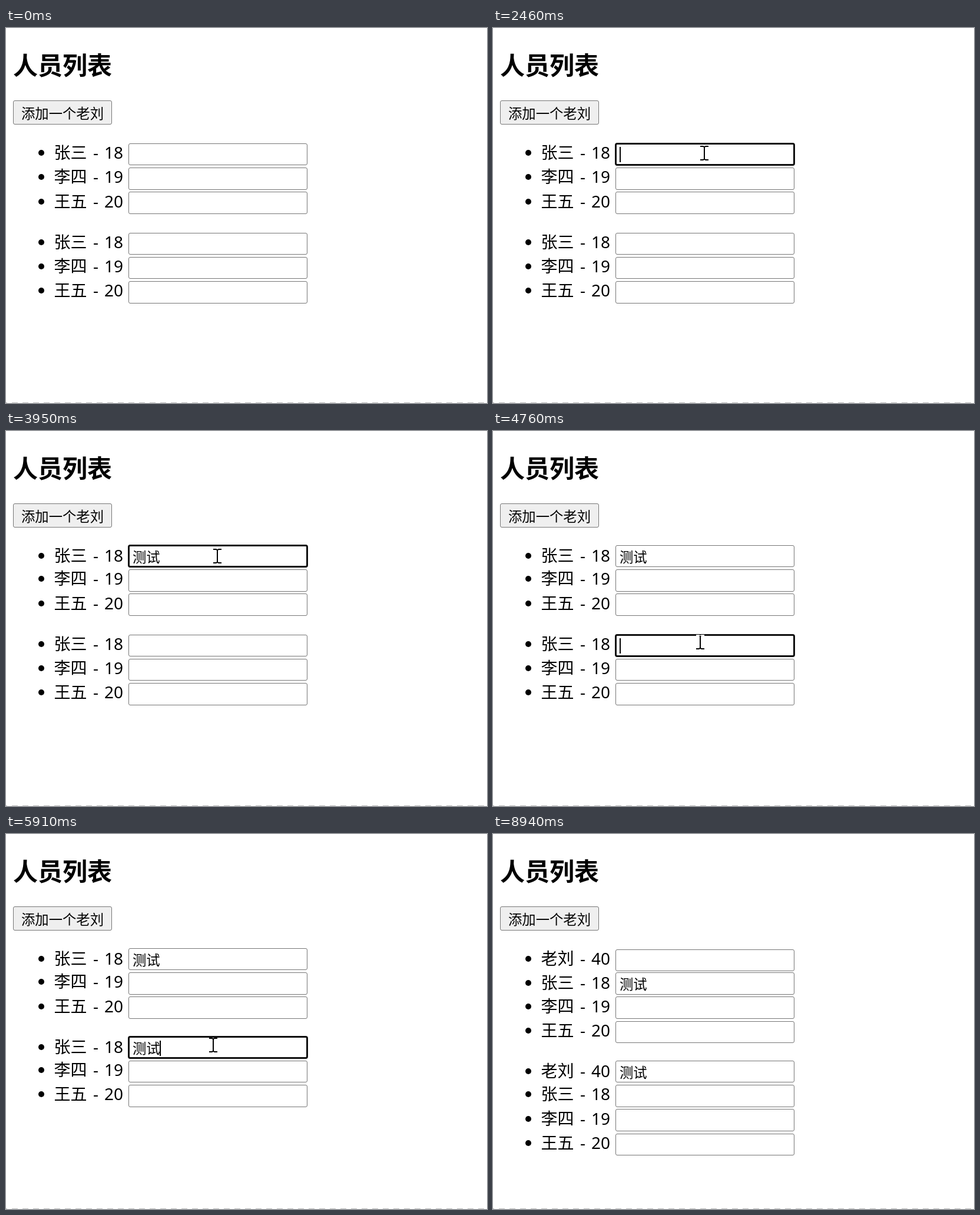
An HTML page that plays this animation: 817x637 px, repeating every 9870 ms.

```html
<!DOCTYPE html>
<html lang="zh-CN">
<head>
<meta charset="utf-8">
<title>人员列表</title>
<style>
  html, body { margin: 0; width: 100%; height: 100%; overflow: hidden; background: #fff; }
  svg { display: block; }
  text { font-family: "Noto Sans CJK SC", "Noto Sans CJK", sans-serif; white-space: pre; }
  .title { font-size: 42px; font-weight: bold; }
  .item { font-size: 28px; }
  .num { font-family: "Noto Sans", "Open Sans", sans-serif; }
  .field { font-size: 23.33px; }
  .latin { font-family: "Liberation Sans", Arial, sans-serif; }
  .spell { font-size: 28px; fill: #eee; }
  .word { font-size: 29.17px; fill: #eee; }
  .index { font-size: 23px; fill: #a5a5a5; }
  .word.first { fill: #f5823c; }
  .index.first { fill: #b5663a; }
  .panel { fill: #212121; filter: drop-shadow(0 0 2px rgba(0, 0, 0, .6)); }
  .chevron { fill: none; stroke-width: 2.4; }
  .beam { mix-blend-mode: difference; fill: #fff; }
</style>
</head>
<body>
<svg id="stage" width="817" height="637" viewBox="0 0 817 637">
  <defs>
    <radialGradient id="blue"><stop stop-color="#2f2c48" stop-opacity=".8"/><stop offset="1" stop-color="#2f2c48" stop-opacity="0"/></radialGradient>
    <radialGradient id="red"><stop stop-color="#52302c" stop-opacity=".8"/><stop offset="1" stop-color="#52302c" stop-opacity="0"/></radialGradient>
  </defs>
  <rect width="817" height="637" fill="#fff"/>
  <text class="title" x="12" y="79">人员列表</text>
  <path d="M0 636.5H817" stroke="#bdbdbd" stroke-dasharray="10 8" stroke-dashoffset="8"/>
  <g id="scene"></g>
  <g id="pointer"></g>
</svg>
<script>
const LOOP = 9870, TICK = 68, BLINK = 530, ROW = 41.2;
const scene = document.getElementById('scene');
const pointer = document.getElementById('pointer');

// time, focused list (-1 for none), spelling being typed, number of filled lists
const steps = [
  [0, -1, '', 0], [1400, 0, '', 0],
  [2810, 0, 'ce', 0], [3010, 0, 'ces', 0], [3150, 0, 'cesh', 0], [3220, 0, 'ceshi', 0],
  [3420, 0, '', 1], [4690, 1, '', 1],
  [4960, 1, 'c', 1], [5030, 1, 'ce', 1], [5430, 1, 'ces', 1], [5570, 1, 'cesh', 1], [5640, 1, 'ceshi', 1],
  [5910, 1, '', 2], [7540, -1, '', 2],
];
const PRESS = 7540, ADDED = 7670;

const moves = [
  { start: 720, count: 10, from: [562, 588], to: [359, 213] },
  { start: 4150, count: 9, from: [359, 213], to: [352, 359] },
  { start: 6440, count: 8, from: [352, 359], to: [121, 132] },
  { start: 8660, count: 4, from: [121, 132], to: [716, 288], leave: true },
];

const people = [['张三', 18], ['李四', 19], ['王五', 20]];
const candidates = {
  c: ['从', '才', '出', '成', '吃'],
  ce: ['测', '册', '侧', '策', '厕'],
  ces: ['测试', '厕所', '测速', '册数', ''],
  cesh: ['测试', '侧视', '策士', '侧室', '册'],
};
candidates.ceshi = candidates.cesh;

const advance = { c: .5, e: .556, s: .5, h: .556, i: .222, "'": .191 };
const measure = (s, size) => [...s].reduce((w, ch) => w + advance[ch] * size, 0);
const text = (cls, x, y, s) => `<text class="${cls}" x="${x}" y="${y}">${s}</text>`;
const box = (x, y, w, h, fill, extra = '') =>
  `<rect x="${x}" y="${y}" width="${w}" height="${h}" fill="${fill}" ${extra}/>`;

function layout(filled, added) {
  const names = added ? [['老刘', 40], ...people] : people;
  // The keyed list keeps its value with the person, the other with the position.
  const filledRow = [filled > 0 ? +added : -1, filled > 1 ? 0 : -1];
  const rows = [];
  let y = 196.05;
  for (let list = 0; list < 2; list++) {
    names.forEach(([name, age], i) => {
      const full = i === filledRow[list];
      if (full) y -= 2;
      const top = Math.round(y);
      rows.push({
        list, name, age, full, top, first: i === 0,
        height: Math.round(y + 37.4) - top,
        mid: Math.round(y + (full ? 18.2 : 16.2)),
      });
      y += ROW;
    });
    y += 28.1;
  }
  return rows;
}

function drawRow(r, focus, typed, caret) {
  const on = r.first && r.list === focus;
  const base = r.mid + 10;
  let out = `<circle cx="60" cy="${r.mid}" r="5"/>`
    + text('item', 81.5, base, r.name)
    + text('item num', 148, base, '-')
    + text('item num', 167, base, r.age)
    + box(208.5, r.top + .5, 303, r.height - 1, '#fff', 'rx="2.5" stroke="#767676"');
  if (on) {
    out += box(208.5, r.top + .5, 303, r.height - 1, '#fff',
      'rx="2.5" stroke="#101010" stroke-width="3"');
  }
  if (r.full) out += text('field', 215, r.mid + 11, '测试');
  if (on && typed) out += text('field latin', 215, base, typed);
  if (on && caret) {
    const x = 215 + (r.full ? 46.5 : measure(typed, 23.33));
    out += box(Math.floor(x), r.mid - (r.full ? 11 : 10), 2, 26, '#000');
  }
  return out;
}

function drawPanel(typed, y) {
  const spell = typed.length > 2 ? `ce'${typed.slice(2)}` : typed;
  let x = 244.5, words = '';
  candidates[typed].forEach((word, i) => {
    const cls = i ? '' : ' first';
    words += text('index num' + cls, x, y + 81, i + 1);
    if (word) {
      words += text('word' + cls, x + 19.5, y + 83, word);
      x += 46.6 + 29.17 * word.length;
    } else {
      words += box(684, y + 52, 38, 38, '#3f4241')
        + `<ellipse cx="703" cy="${y + 71}" rx="10" ry="9" fill="#2e2828"/>`
        + `<path d="M723 ${y + 86}h8l-4 4z" fill="#aaa"/>`;
      x += 94;
    }
  });
  const next = x + 38.5, right = next + 51, cy = y + 75, width = right - 217;
  const glow = (cx, cy, rx, ry, id) =>
    `<ellipse cx="${cx}" cy="${cy}" rx="${rx}" ry="${ry}" fill="url(#${id})"/>`;
  return `<rect class="panel" x="217" y="${y}" width="${width}" height="106" rx="4"/>`
    + `<svg x="217" y="${y}" width="${width}" height="106">`
    + glow(width - 80, 16, 60, 40, 'blue') + glow(width - 12, 8, 60, 56, 'red') + '</svg>'
    + `<circle cx="${next + 11}" cy="${y + 27}" r="17" fill="#f07a2a"/>`
    + text('spell latin', 244, y + 37, spell)
    + box(Math.floor(244 + measure(spell, 28)), y + 11, 1.5, 32, '#e8722e')
    + words
    + `<path class="chevron" stroke="#8c8c8c" d="M${next - 22} ${cy - 7}l-7 7l7 7"/>`
    + `<path class="chevron" stroke="#eee" d="M${next - 4} ${cy - 7}l7 7l-7 7"/>`;
}

function drawButton(hover, active) {
  const [fill, line] = active ? ['#f5f5f5', '#8d8d8d'] : hover ? ['#e5e5e5', '#4f4f4f'] : ['#efefef', '#767676'];
  return box(12.5, 123.5, 167, 40, fill, `rx="2.5" stroke="${line}"`)
    + text('field', 26, 154, '添加一个老刘');
}

function cursorAt(t) {
  const move = moves.filter(m => t >= m.start).pop();
  if (!move) return null;
  const k = Math.floor((t - move.start) / TICK);
  if (move.leave && k >= move.count) return null;
  const p = Math.min(1, (k + (move.start > 720)) / move.count);
  const e = move.leave ? p : p * (2 - p);
  return move.from.map((a, i) => Math.round(a + (move.to[i] - a) * e));
}

function drawPointer(at, rows) {
  if (!at) return '';
  const [x, y] = at;
  const inField = x > 208 && x < 512 && rows.some(r => y >= r.top && y < r.top + r.height);
  return inField
    ? `<path class="beam" d="M${x - 7} ${y - 13}h5l2 1l2 -1h5v2h-5l-1 1v19l1 1h5v2h-5l-2 -1l-2 1h-5v-2h5l1 -1v-19l-1 -1h-5z"/>`
    : `<path d="M${x} ${y}v23l5.2 -4.8l4 8.6l4 -1.8l-3.9 -8.3h7z" fill="#fff" stroke="#000" stroke-width="1.2"/>`;
}

function update(node, markup) {
  if (node.markup !== markup) node.innerHTML = node.markup = markup;
}

function render(t) {
  const [since, focus, typed, filled] = steps.filter(s => t >= s[0]).pop();
  const rows = layout(filled, t >= ADDED);
  const at = cursorAt(t);
  const hover = at && at[0] >= 12 && at[0] < 180 && at[1] >= 123 && at[1] < 164;
  const caret = (t - since) % (2 * BLINK) < BLINK;
  update(scene, drawButton(hover, t >= PRESS && t < ADDED)
    + rows.map(r => drawRow(r, focus, typed, caret)).join('')
    + (typed ? drawPanel(typed, focus ? 377 : 229) : ''));
  update(pointer, drawPointer(at, rows));
}

const began = performance.now();
function frame() {
  render((performance.now() - began) % LOOP);
  requestAnimationFrame(frame);
}
frame();
</script>
</body>
</html>
```
